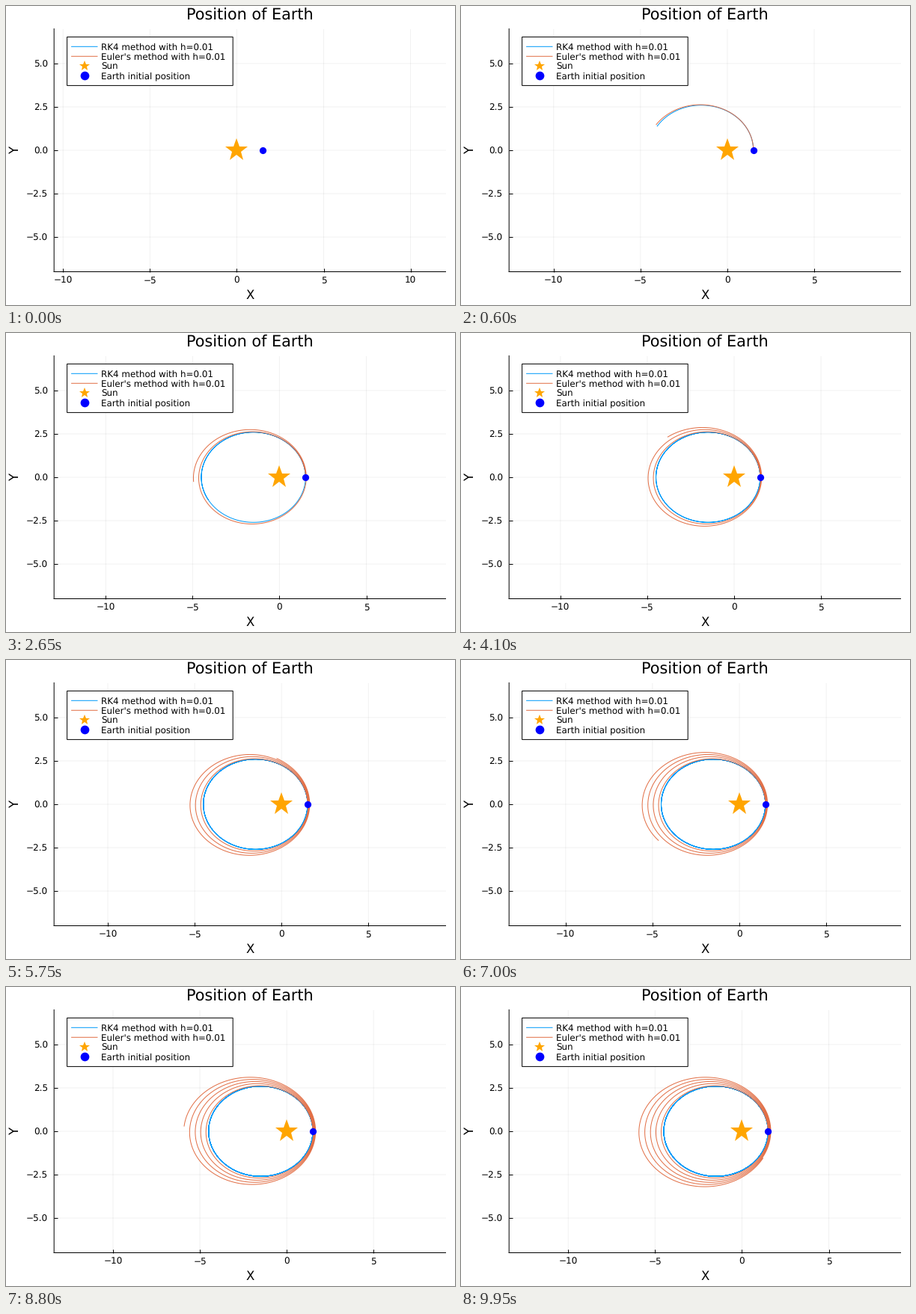
Animation, 600 px wide and 400 px high, one loop 10 s. Source, as a matplotlib script:

```python
import math

import matplotlib.pyplot as plt
import numpy as np
from matplotlib.animation import FuncAnimation
from matplotlib.patches import Rectangle
from matplotlib.ticker import MultipleLocator

W, H, DPI = 600, 400, 100
LEFT, RIGHT, TOP, BOTTOM = 64.2, 587.5, 30.5, 355.5
FRAMES, INTERVAL = 200, 50
STEP, STEPS_PER_FRAME = 0.01, 100
THIN = 5  # steps between drawn points
Y_LIMIT = 7
BLUE, RED = "#009afa", "#e26f46"
SUN, EARTH = "orange", "blue"

plt.rcParams.update({
    "font.family": "DejaVu Sans",
    "text.hinting": "none",
    "path.simplify": False,
    "path.snap": False,
})


def px(n):
    """Convert pixels to points."""
    return n * 72 / DPI


def slope(s):
    x, y, vx, vy = s
    r3 = math.hypot(x, y) ** 3
    return vx, vy, -x / r3, -y / r3


def move(s, d, h):
    return tuple(a + h * b for a, b in zip(s, d))


def euler(s, h):
    return move(s, slope(s), h)


def rk4(s, h):
    k1 = slope(s)
    k2 = slope(move(s, k1, h / 2))
    k3 = slope(move(s, k2, h / 2))
    k4 = slope(move(s, k3, h))
    mean = [(a + 2 * b + 2 * c + d) / 6 for a, b, c, d in zip(k1, k2, k3, k4)]
    return move(s, mean, h)


def orbit(method):
    s = (1.5, 0.0, 0.0, 1.0)
    points = [s[:2]]
    for _ in range((FRAMES - 1) * STEPS_PER_FRAME):
        s = method(s, STEP)
        points.append(s[:2])
    return np.array(points)


rk_path, euler_path = orbit(rk4), orbit(euler)

# The view follows the middle of everything drawn so far.
both_x = np.stack([rk_path[:, 0], euler_path[:, 0]])
low = np.minimum(np.minimum.accumulate(both_x.min(axis=0)), 0)
high = np.maximum.accumulate(both_x.max(axis=0))
center = (low + high) / 2
half_width = (RIGHT - LEFT) / (BOTTOM - TOP) * Y_LIMIT

fig = plt.figure(figsize=(W / DPI, H / DPI), dpi=DPI, facecolor="white")
ax = fig.add_axes([LEFT / W, 1 - BOTTOM / H, (RIGHT - LEFT) / W, (BOTTOM - TOP) / H])
ax.set_ylim(-Y_LIMIT, Y_LIMIT)
ax.xaxis.set_major_locator(MultipleLocator(5))
ax.set_yticks([-5, -2.5, 0, 2.5, 5])
ax.set_axisbelow(True)
ax.grid(color="black", alpha=0.055, linewidth=px(1))
ax.tick_params(direction="in", length=px(4.7), width=px(1), labelsize=px(12))
ax.tick_params(axis="x", pad=px(6.4))
ax.tick_params(axis="y", pad=px(8))
for side in ("top", "right"):
    ax.spines[side].set_visible(False)
for side in ("left", "bottom"):
    ax.spines[side].set_linewidth(px(1))
    ax.spines[side].set_snap(False)

rk_line, = ax.plot([], [], color=BLUE, lw=px(1), zorder=3)
euler_line, = ax.plot([], [], color=RED, lw=px(1), zorder=4)
ax.plot(0, 0, "*", color=SUN, ms=px(31.6), mew=0, zorder=5)
ax.plot(1.5, 0, "o", color=EARTH, ms=px(9.2), mew=0, zorder=6)

# Titles and legend, laid out in pixels from the top left corner.
page = fig.add_axes([0, 0, 1, 1])
page.set_xlim(0, W)
page.set_ylim(H, 0)
page.axis("off")


def label(x, y, text, size, **style):
    page.text(x, y, text, fontsize=px(size), **style)


mid_x, mid_y = (LEFT + RIGHT) / 2, (TOP + BOTTOM) / 2
label(mid_x, 18.5, "Position of Earth", 20.8, ha="center")
label(mid_x, 392.5, "X", 16.5, ha="center")
label(12.2, mid_y, "Y", 16.5, ha="center", va="center", rotation=90)

page.add_patch(Rectangle((81.6, 41.4), 221.6, 65, fc="white", ec="black",
                         lw=px(1), snap=False))
names = ["RK4 method with h=0.01", "Euler's method with h=0.01",
         "Sun", "Earth initial position"]
rows = [54.3 + 13 * i for i in range(4)]
for y, name in zip(rows, names):
    label(126.9, y + 4.6, name, 11.95)
for y, color in zip(rows, (BLUE, RED)):
    page.plot([87.6, 122], [y, y], color=color, lw=px(1))
for y, shape, color, size in zip(rows[2:], "*o", (SUN, EARTH), (14.2, 11.7)):
    page.plot(104.7, y, shape, color=color, ms=px(size), mew=0)


def update(frame):
    last = frame * STEPS_PER_FRAME
    rk_line.set_data(*rk_path[:last + 1:THIN].T)
    euler_line.set_data(*euler_path[:last + 1:THIN].T)
    ax.set_xlim(center[last] - half_width, center[last] + half_width)
    return rk_line, euler_line


anim = FuncAnimation(fig, update, frames=FRAMES, interval=INTERVAL,
                     repeat=True, repeat_delay=0, blit=False)
plt.show()
```
